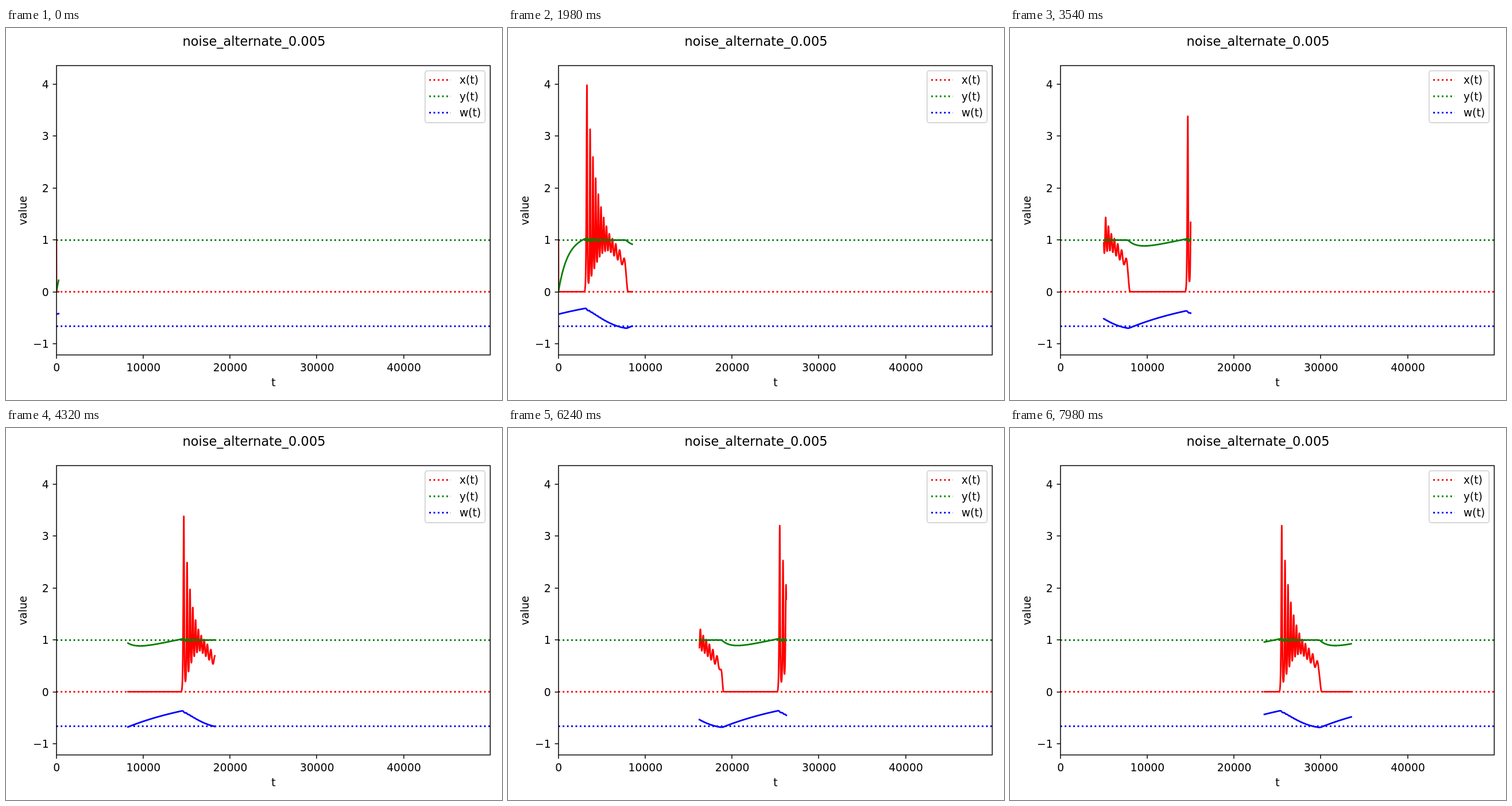
An HTML page with a canvas for the animation above (8000 ms loop, 864x648 px).

```html
<!DOCTYPE html>
<html lang="en">
<head>
<meta charset="utf-8">
<title>noise_alternate_0.005</title>
<style>
html, body { margin: 0; width: 100%; height: 100%; overflow: hidden; background: #fff; }
canvas { display: block; }
</style>
</head>
<body>
<canvas id="plot" width="864" height="648"></canvas>
<script>
const ctx = document.getElementById('plot').getContext('2d');

const LOOP = 8000, STEP = 60, T_PER_STEP = 250, WINDOW = 10000;
const LEFT = 88, RIGHT = 843.5, TOP = 65.5, BOTTOM = 569.5;
const tx = t => 87.8 + t * 0.01512;
const vy = v => 459.7 - v * 90.4;

// Each burst: time of its first peak, duration, log of the mean level,
// swing of log x and how fast it decays, and the base period of the spikes
const bursts = [
  { peak: 3294, length: 4820, level: 0.23, swing: 1.8, decay: 1100, period: 300 },
  { peak: 14683, length: 4445, level: 0.12, swing: 1.68, decay: 820, period: 312 },
  { peak: 25509, length: 4676, level: 0.10, swing: 1.63, decay: 1000, period: 316 }
];

// log x at time u after the first peak; even harmonics sharpen the spikes
function logX(b, u, phase) {
  if (u < 0) return logX(b, 0, 0) - 2 * Math.log(Math.cosh(u / 80));
  const a = Math.max(b.swing * Math.exp(-u / b.decay), 0.17);
  const middle = b.level - (u / b.length) ** 2 - a ** 2 / 4 + a ** 4 / 64;
  const wave = a * Math.cos(phase) + a * a / 12 * (Math.cos(2 * phase) - 1);
  const collapse = Math.exp((u - b.length + 230) / 90);
  return middle + wave - collapse;
}

// x follows the bursts, w is slow feedback driven by x, and y relaxes toward
// a level set by w except while a burst holds it at 1 + (log x)'
const DT = 10, FLOOR = 0.003;
function simulate(end) {
  const samples = [];
  let y = 0, w = -0.428, phase = 0, previous = 0;
  for (let t = 0; t <= end; t += DT) {
    const b = bursts.findLast(b => t > b.peak - 1000) || bursts[0];
    const u = t - b.peak;
    const period = b.period + 100 * Math.exp(-u / 400) + 500 * (u / b.length) ** 4;
    phase = u < 0 ? 0 : phase + 2 * Math.PI * DT / period;
    const lx = logX(b, u, phase);
    const x = FLOOR + Math.exp(-t) + Math.exp(lx);
    samples.push([x, y, w]);
    if (u >= 0 && u < b.length - 300) y = 1 + (lx - previous) / DT;
    else y += DT * 0.001 * (1.512 + 1.56 * w + 0.844 * w * w - y);
    w -= DT * 0.0001 * (w + 1.33 * Math.log1p(2 * x));
    previous = lx;
  }
  return samples;
}
const samples = simulate(Math.ceil(LOOP / STEP) * T_PER_STEP);

const series = [
  { name: 'x(t)', color: '#f00', level: 459.5 },
  { name: 'y(t)', color: '#008000', level: 369.5 },
  { name: 'w(t)', color: '#00f', level: 519.5 }
];

function line(x0, y0, x1, y1, color, width, dash = []) {
  ctx.strokeStyle = color;
  ctx.lineWidth = width;
  ctx.lineCap = 'butt';
  ctx.setLineDash(dash);
  ctx.beginPath();
  ctx.moveTo(x0, y0);
  ctx.lineTo(x1, y1);
  ctx.stroke();
  ctx.setLineDash([]);
}
const dotted = (x0, x1, y, color) => line(x0, y, x1, y, color, 2.81, [2.81, 4.64]);

function text(str, x, y, align = 'center', size = 18.75) {
  ctx.font = `${size}px "DejaVu Sans", sans-serif`;
  ctx.textAlign = align;
  ctx.fillStyle = '#000';
  ctx.fillText(str, x, y);
}

function drawCurve(index, color, from, to) {
  ctx.strokeStyle = color;
  ctx.lineWidth = 2.81;
  ctx.lineCap = 'square';
  ctx.lineJoin = 'round';
  ctx.beginPath();
  for (let t = from; t <= to; t += DT) ctx.lineTo(tx(t), vy(samples[t / DT][index]));
  ctx.stroke();
}

function drawAxes() {
  ctx.strokeStyle = '#000';
  ctx.lineWidth = 1.5;
  ctx.lineJoin = 'miter';
  ctx.strokeRect(LEFT, TOP, RIGHT - LEFT, BOTTOM - TOP);
  for (let t = 0; t <= 40000; t += 10000) {
    const x = Math.round(tx(t));
    line(x, BOTTOM, x, BOTTOM + 6.5, '#000', 1.5);
    text(String(t), tx(t) + 0.4, 597.5);
  }
  for (let v = -1; v <= 4; v++) {
    const y = Math.round(vy(v));
    line(LEFT - 6.5, y, LEFT, y, '#000', 1.5);
    text(String(v).replace('-', '\u2212'), 74.6, vy(v) + 6.9, 'right');
  }
  text('noise_alternate_0.005', 432, 30.7, 'center', 22.5);
  text('t', 466, 624);
  ctx.save();
  ctx.translate(35.5, 318);
  ctx.rotate(-Math.PI / 2);
  text('value', 0, 0);
  ctx.restore();
}

function drawLegend() {
  ctx.beginPath();
  ctx.roundRect(730, 74.5, 104.5, 90.5, 3.75);
  ctx.fillStyle = 'rgba(255,255,255,.8)';
  ctx.fill();
  ctx.strokeStyle = 'rgba(204,204,204,.8)';
  ctx.lineWidth = 1.88;
  ctx.stroke();
  series.forEach(({ name, color }, i) => {
    const y = 90.5 + i * 28.5;
    dotted(737.3, 774.8, y, color);
    text(name, 790, y + 6.7, 'left');
  });
}

function draw(now) {
  const head = (Math.floor(now % LOOP / STEP) + 1) * T_PER_STEP;
  const tail = Math.max(0, head - WINDOW);
  ctx.fillStyle = '#fff';
  ctx.fillRect(0, 0, 864, 648);
  ctx.save();
  ctx.beginPath();
  ctx.rect(LEFT, TOP, RIGHT - LEFT, BOTTOM - TOP);
  ctx.clip();
  for (const s of series) dotted(tx(0), RIGHT, s.level, s.color);
  series.forEach((s, i) => drawCurve(i, s.color, tail, head));
  ctx.restore();
  drawAxes();
  drawLegend();
}

const start = performance.now();
function tick() {
  draw(performance.now() - start);
  requestAnimationFrame(tick);
}
tick();
</script>
</body>
</html>
```
